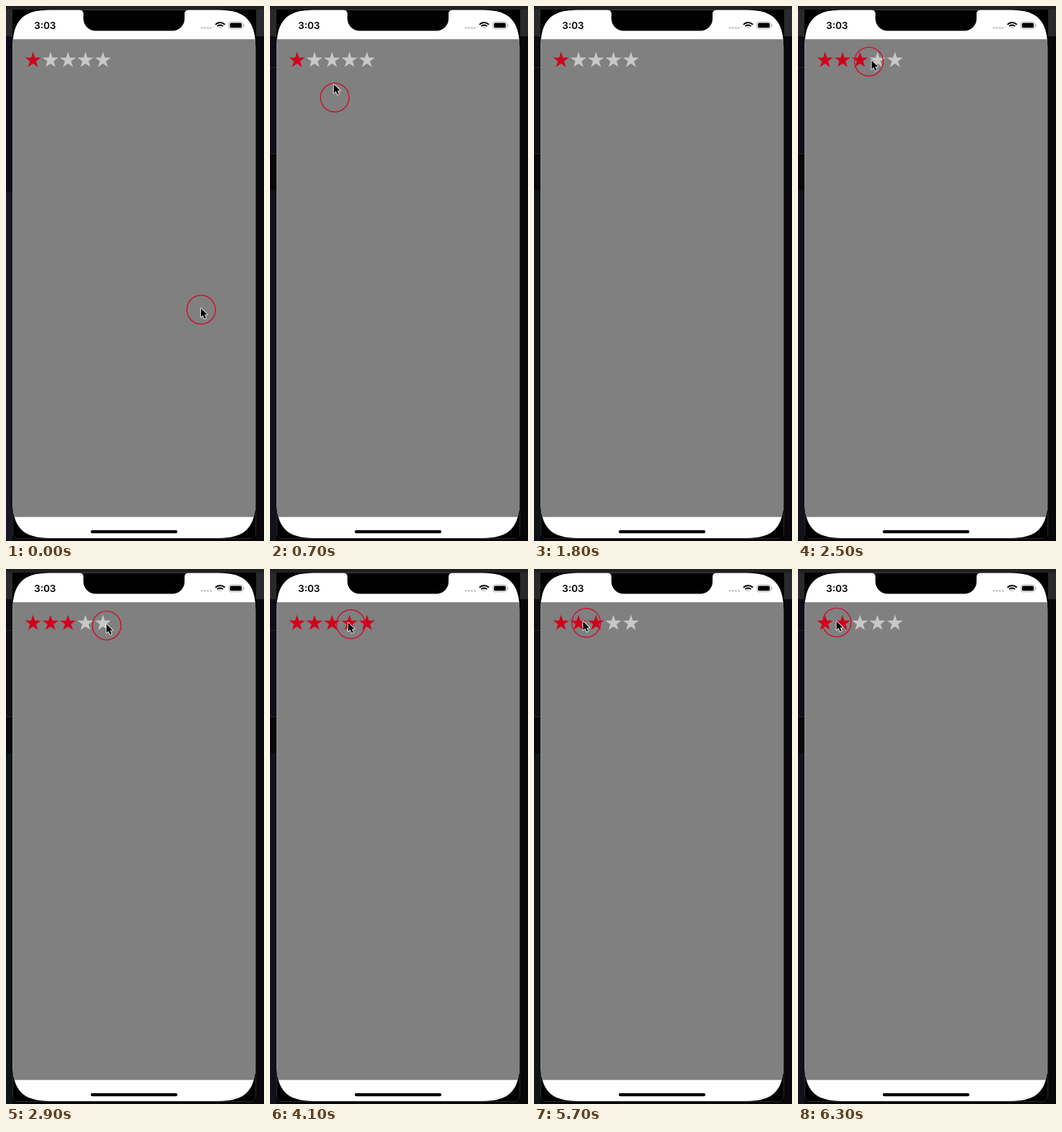
These frames come from a looping animation (360x744 px, 6900 ms). An HTML page with a canvas:

```html
<!DOCTYPE html>
<html lang="en">
<head>
<meta charset="utf-8">
<title>Star rating</title>
<style>
html, body { margin: 0; width: 100%; height: 100%; overflow: hidden; background: #000; }
canvas { display: block; }
</style>
</head>
<body>
<canvas id="stage" width="360" height="744"></canvas>
<script>
const ctx = document.getElementById('stage').getContext('2d');
const LOOP = 6900, STEP = 100, POINTER_LEAD = 30;
const RED = '#d0021b', GREY = '#c9c9c9';
const screen = { left: 9.2, top: 5.6, right: 348.2, bottom: 740, radius: 41 };

const start = { x: 272.3, y: 422.3 };
// The ring rests between these glides
const glides = [
  { at: 50, take: 650, x: 90.4, y: 127.3 },
  { at: 700, take: 100, x: 87, y: 72 },
  { at: 1300, take: 300, x: 70, y: -40 },
  { at: 1800, take: 200, x: 85, y: 77 },
  { at: 2400, take: 400, x: 140.5, y: 78.6 },
  { at: 3850, take: 500, x: 85, y: 75 },
  { at: 5610, take: 230, x: 54, y: 74.4 }
];

function positionAt(t) {
  let { x, y } = start;
  for (const g of glides) {
    const k = Math.min(1, Math.max(0, (t - g.at) / g.take));
    x += (g.x - x) * k;
    y += (g.y - y) * k;
  }
  return [x, y];
}

function ratingAt(t) {
  if (t < 2000) return 1;
  if (t < 3300) return 3;
  if (t < 5000) return 5;
  return t < 6300 ? 3 : 2;
}

function rect(x, y, w, h, color) {
  ctx.fillStyle = color;
  ctx.fillRect(x, y, w, h);
}

function fillRound(x, y, w, h, r, color) {
  ctx.beginPath();
  ctx.roundRect(x, y, w, h, r);
  ctx.fillStyle = color;
  ctx.fill();
}

function strokeRound(x, y, w, h, r, color, width) {
  ctx.beginPath();
  ctx.roundRect(x, y, w, h, r);
  ctx.strokeStyle = color;
  ctx.lineWidth = width;
  ctx.stroke();
}

function drawSurround(t) {
  rect(0, 0, 360, 744, '#08080a');
  rect(0, 0, 360, 42, '#29292c');
  rect(0, 0, 360, 5, '#202023');
  if (t < 100) {
    rect(0, 42, 9, 216, '#0b0a18');
    rect(0, 258, 9, 486, '#171624');
  } else {
    rect(0, 42, 9, 163, '#0d0d15');
    rect(0, 205, 9, 51, '#06060b');
    rect(0, 256, 9, 488, '#10121a');
    for (const y of [85, 205]) rect(0, y, 9, 1, '#24252d');
  }
  rect(9, 5, 340, 736, '#000');
  strokeRound(9.5, 690, 339, 50.5, [0, 0, 7, 7], '#29292b', 1);
}

// Continuous-curvature corners: longer than an arc, equally deep
function screenPath() {
  const { left, top, right, bottom, radius } = screen;
  const reach = radius * 1.28, pull = reach * 0.277;
  ctx.beginPath();
  for (const [x, y, dx, dy] of [[left, top, 1, 1], [right, top, -1, 1], [right, bottom, -1, -1], [left, bottom, 1, -1]]) {
    const side = [[x, y + dy * reach], [x, y + dy * pull]];
    const edge = [[x + dx * pull, y], [x + dx * reach, y]];
    const [a, b, c, d] = dx === dy ? [...side, ...edge] : [...side, ...edge].reverse();
    ctx.lineTo(...a);
    ctx.bezierCurveTo(...b, ...c, ...d);
  }
  ctx.closePath();
}

function drawNotch() {
  const left = 108, right = 249.2, top = screen.top, bottom = 34.6;
  ctx.beginPath();
  ctx.moveTo(left - 5, top);
  ctx.arcTo(left, top, left, bottom, 5);
  ctx.arcTo(left, bottom, right, bottom, 17);
  ctx.arcTo(right, bottom, right, top, 17);
  ctx.arcTo(right, top, right + 5, top, 5);
  ctx.lineTo(right + 5, top - 1);
  ctx.lineTo(left - 5, top - 1);
  ctx.fillStyle = '#000';
  ctx.fill();
}

function drawStatus() {
  ctx.fillStyle = '#000';
  ctx.font = '600 13.5px Inter, sans-serif';
  ctx.fillText('3:03', 39.3, 31.8);
  for (let i = 0; i < 4; i++) fillRound(272 + i * 4, 28.8, 3, 3, 1.5, '#c8c8c8');

  const wedge = r => ctx.arc(298.8, 32, r, -Math.PI * 0.76, -Math.PI * 0.24);
  ctx.strokeStyle = '#000';
  ctx.lineWidth = 2;
  for (const r of [9, 5.6]) {
    ctx.beginPath();
    wedge(r);
    ctx.stroke();
  }
  ctx.beginPath();
  ctx.moveTo(298.8, 32);
  wedge(3.2);
  ctx.fill();

  strokeRound(310.9, 22, 19.6, 9.8, 3, '#b0b0b0', 0.9);
  fillRound(312.5, 23.5, 16.4, 6.8, 1.6, '#000');
  fillRound(331.3, 25.3, 1.2, 3.2, 0.6, '#b0b0b0');
}

function drawStar(x, y, color) {
  ctx.beginPath();
  for (let i = 0; i < 10; i++) {
    const r = i % 2 ? 4.5 : 11.7, a = i * Math.PI / 5 - Math.PI / 2;
    ctx.lineTo(x + r * Math.cos(a), y + r * Math.sin(a));
  }
  ctx.closePath();
  ctx.fillStyle = color;
  ctx.fill();
}

function drawRing(t) {
  ctx.beginPath();
  ctx.arc(...positionAt(t), 20, 0, Math.PI * 2);
  ctx.strokeStyle = '#cf0d2d';
  ctx.lineWidth = 1.4;
  ctx.stroke();
}

function drawPointer(t) {
  const [x, y] = positionAt(t + POINTER_LEAD);
  ctx.save();
  ctx.translate(x - 0.3, y - 1.8);
  const arrow = new Path2D('M0 0V12L2.8 9.5 4.9 14.2 7 13.3 5 8.8 8.7 8.6Z');
  ctx.lineJoin = 'round';
  ctx.strokeStyle = '#eee';
  ctx.lineWidth = 1.8;
  ctx.stroke(arrow);
  ctx.fillStyle = '#000';
  ctx.fill(arrow);
  ctx.restore();
}

function draw(t) {
  drawSurround(t);
  ctx.save();
  screenPath();
  ctx.clip();
  rect(9, 5, 340, 736, '#fff');
  rect(9, 46.2, 340, 664.4, '#808080');
  drawNotch();
  drawStatus();
  fillRound(118.2, 728.9, 121, 4.4, 2.2, '#000');
  const rating = ratingAt(t);
  for (let i = 0; i < 5; i++) drawStar(37.7 + i * 24.4, 75.4, i < rating ? RED : GREY);
  drawRing(t);
  drawPointer(t);
  ctx.restore();
}

function tick() {
  const t = performance.now() % LOOP;
  draw(Math.floor(t / STEP) * STEP);
  requestAnimationFrame(tick);
}
tick();
</script>
</body>
</html>
```
